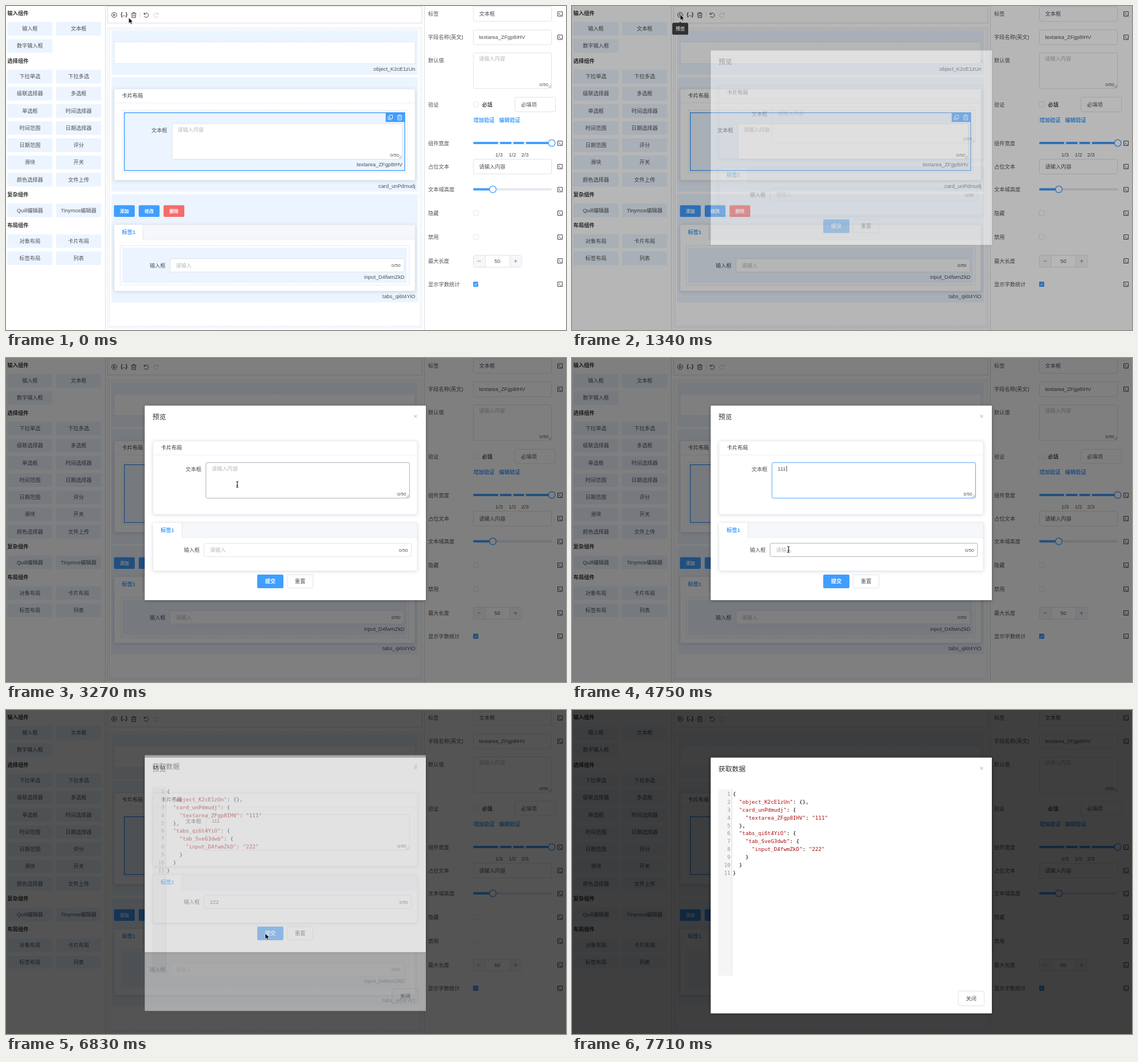
These frames come from a looping animation (983 px wide and 570 px high, 8170 ms). An HTML page:

```html
<!DOCTYPE html>
<html lang="zh-CN">
<head>
<meta charset="utf-8">
<title>表单设计器</title>
<style>
html, body { margin: 0; width: 100%; height: 100%; overflow: hidden; background: #fff; }
svg { display: block; width: 100vw; height: 100vh; }
text { font: 9.24px "Liberation Sans", "Noto Sans CJK SC", "Noto Sans CJK", sans-serif; fill: #505255; }
.dark { fill: #303133; }
.bold { font-weight: 700; }
.blue { fill: #409eff; }
.hint { fill: #b4b7bd; }
.small { font-size: 8.1px; }
.title { font-size: 11.9px; fill: #303133; }
.white { fill: #fff; }
.mid { text-anchor: middle; }
.end { text-anchor: end; }
.code { font-family: "DejaVu Sans Mono", "Liberation Mono", monospace; fill: #000; }
.line { fill: none; stroke: #333; stroke-width: .9; }
.shadow { filter: drop-shadow(0 1.3px 3px rgba(0, 0, 0, .13)); }
</style>
</head>
<body>
<svg id="stage" viewBox="0 0 983 570" preserveAspectRatio="none"></svg>
<style id="motion"></style>
<script>
const LOOP = 8170, BLUE = '#409eff', PALE = '#ecf5ff', BORDER = '#dcdfe6';
const rules = [];

// Holds each [ms, css] state until the next one.
function track(markup, states) {
  const name = 'm' + rules.length;
  rules.push(`@keyframes ${name}{${states.map(([ms, css]) => `${(ms / LOOP * 100).toFixed(4)}%{${css}}`).join('')}}`);
  return `<g style="animation:${name} ${LOOP}ms step-end infinite">${markup}</g>`;
}
function during(markup, ...spans) {
  const states = [[0, 'opacity:0']];
  for (const [from, to] of spans) states.push([from, 'opacity:1'], [to, 'opacity:0']);
  return track(markup, states);
}

const text = (x, y, str, cls = '') => `<text x="${x}" y="${y}" dy=".35em" class="${cls}">${str}</text>`;
const box = (x1, y1, x2, y2, fill, stroke = 'none', more = '') =>
  `<rect x="${x1}" y="${y1}" width="${x2 - x1}" height="${y2 - y1}" fill="${fill}" stroke="${stroke}" ${more}/>`;
const path = (d, more = 'class="line"') => `<path d="${d}" ${more}/>`;
const field = (x1, y1, x2, y2, stroke = BORDER, fill = '#fff') => box(x1, y1, x2, y2, fill, stroke, 'rx="2.6" stroke-width=".9"');
const dashed = (x1, y1, x2, y2, fill = 'none') => box(x1, y1, x2, y2, fill, '#c9d5e4', 'stroke-width=".8" stroke-dasharray="2 1.4"');
const button = (x1, y1, x2, y2, label, fill, cls = 'mid small white bold') =>
  box(x1, y1, x2, y2, fill, 'none', 'rx="2"') + text((x1 + x2) / 2, (y1 + y2) / 2, label, cls);
const grip = (x, y) => path(`M${x - 5} ${y}L${x} ${y - 5}M${x - 2.5} ${y}L${x} ${y - 2.5}`, 'stroke="#777" stroke-width=".7"');
const card = (x1, y1, x2, y2) => `<g class="shadow">${box(x1, y1, x2, y2, '#fff', '#e4e7ed', 'rx="2.6" stroke-width=".8"')}</g>`;

function tabCard(x1, y1, x2, y2, tabEnd) {
  return card(x1, y1, x2, y2) + box(x1, y1, x2, y1 + 26, '#f5f7fa', '#e4e7ed', 'stroke-width=".7"') +
    box(x1, y1, tabEnd, y1 + 27, '#fff') + path(`M${tabEnd} ${y1}v26`, `stroke="${BORDER}" stroke-width=".7"`) +
    text(x1 + 13.5, y1 + 13, '标签1', 'blue bold');
}

function palette() {
  const groups = [
    [12.5, 40, '输入组件', '输入框 文本框 数字输入框'],
    [97, 124, '选择组件', '下拉单选 下拉多选 级联选择器 多选框 单选框 时间选择器 时间范围 日期选择器 日期范围 评分 滑块 开关 颜色选择器 文件上传'],
    [332, 359.5, '复杂组件', 'Quill编辑器 Tinymce编辑器'],
    [386, 413.5, '布局组件', '对象布局 卡片布局 标签布局 列表']
  ];
  return groups.map(([y, first, name, items]) => text(2.5, y, name, 'dark bold') +
    items.split(' ').map((item, i) => {
      const x = i % 2 ? 88 : 2.5, cy = first + (i >> 1) * 30.25;
      return box(x, cy - 12, x + 79, cy + 12, PALE) + text(x + 39.5, cy, item, 'mid');
    }).join('')).join('') + path('M174.5 0V570M734.5 0V570', 'stroke="#dcdcdc"');
}

const trash = (x, y, stroke = '#333') =>
  path(`M${x - 4.5} ${y - 2.8}h9M${x - 1.5} ${y - 3}v-1.5h3v1.5M${x - 3.3} ${y - 2.8}v7.3h6.6v-7.3M${x - 1.1} ${y - .5}v3M${x + 1.1} ${y - .5}v3`,
    `fill="none" stroke="${stroke}" stroke-width=".9"`);

function toolbar() {
  const undo = 'M-3.6 -4v3h3M-3.4 -1.2A3.9 3.9 0 1 1 -3.4 2.2';
  return box(178.5, .5, 730, 30, '#fff', '#dcdcdc') +
    '<circle cx="190" cy="15.7" r="4.5" class="line"/>' + path('M188.7 13.6v4.2l3.4-2.1Z') +
    text(207.3, 15, '{..}', 'mid dark bold') + trash(224.3, 15.8) +
    path('M235.5 10.5v10', 'stroke="#dcdfe6"') +
    path(undo, 'class="line" transform="translate(246 15.7)"') +
    path(undo, 'fill="none" stroke="#c6c8cc" stroke-width=".9" transform="translate(263.3 15.7) scale(-1 1)"');
}

function canvas() {
  return dashed(178.5, 38.5, 730, 566) + dashed(181.5, 41, 727, 563.5) +
    box(185, 43, 723, 121, PALE) + dashed(190, 63, 718, 101.5, '#fff') + text(718.5, 111, 'object_K2cE1zUn', 'end') +
    box(185, 125, 723, 326.5, PALE) + card(190, 146, 718, 306.5) + text(203.5, 157.5, '卡片布局', 'dark') +
    path('M190 170.5H718', 'stroke="#e8ebf1" stroke-width=".8"') + dashed(204, 183.5, 704, 293.5) +
    box(207.7, 187.7, 700, 289.5, PALE, BLUE, 'stroke-width="1.4"') + box(666.5, 187.5, 700, 204, BLUE) +
    path('M671 194v6h5.5M673 192h5.5v6H673Z', 'fill="none" stroke="#fff" stroke-width=".9"') + trash(691, 196, '#fff') +
    text(283, 218.5, '文本框', 'end') + field(291.5, 207, 695.5, 269.5) + text(301, 217.5, '请输入内容', 'hint') +
    text(690, 262, '0/50', 'end small') + grip(694.5, 268.5) +
    text(696, 279, 'textarea_ZFgp8IHV', 'end') + text(718.5, 316.5, 'card_unPdmudj', 'end') +
    box(185, 331, 723, 521.5, PALE) +
    button(189.5, 350.5, 226, 371, '添加', BLUE) + button(233, 350.5, 269.5, 371, '修改', BLUE) + button(276.5, 350.5, 313, 371, '删除', '#f56c6c') +
    tabCard(190, 385, 718, 501.5, 240.5) + dashed(200.5, 421.5, 707.5, 491) + box(204, 425, 704, 487.5, PALE) +
    text(280, 456.5, '输入框', 'end') + field(288, 444.5, 699, 468) + text(298, 456.5, '请输入', 'hint') +
    text(692.5, 456.5, '0/50', 'end small') + text(699.5, 477, 'input_D4fwmZkD', 'end') + text(718.5, 511, 'tabs_qi6t4YiO', 'end');
}

function properties() {
  const labels = { 标签: 14, '字段名称(英文)': 55, 默认值: 96, 验证: 173.5, 组件宽度: 241.5, 占位文本: 282.5, 文本域高度: 323, 隐藏: 364.5, 禁用: 406.5, 最大长度: 448.5, 显示字数统计: 489.5 };
  const script = y => path(`M968.5 ${y - 4}h8v8h-8ZM970.3 ${y - 2}l2 2-2 2M973 ${y + 2.2}h2`);
  const check = y => box(820.5, y - 4.5, 829, y + 4, '#fff', BORDER, 'rx="1.2" stroke-width=".8"');
  const knob = (x, y) => `<circle cx="${x}" cy="${y}" r="5.9" fill="#fff" stroke="${BLUE}" stroke-width="1.3"/>`;
  const bar = (x2, y, fill) => box(820, y - 2, x2, y + 2, fill, 'none', 'rx="2"');
  const input = (y, str) => field(820.5, y - 13, 957.5, y + 13) + text(830.5, y, str);
  return Object.entries(labels).map(([name, y]) =>
      text(741, y, name) + (name === '默认值' || name === '验证' ? '' : script(y))).join('') +
    input(14, '文本框') + input(55, 'textarea_ZFgp8IHV') + input(282.5, '请输入内容') +
    field(820.5, 82.5, 957.5, 145) + text(830, 93, '请输入内容', 'hint') + text(952, 138, '0/50', 'end small') + grip(957, 144) +
    check(173.5) + text(835.5, 173.5, '必填', 'bold') + field(893.5, 160.5, 964.5, 186) + text(904, 173.5, '必填项') +
    text(820.5, 201, '增加验证', 'blue bold') + text(865.5, 201, '编辑验证', 'blue bold') +
    bar(958, 241, BLUE) + [865.5, 889, 911].map((x, i) =>
      `<circle cx="${x}" cy="241" r="2" fill="#fff"/>` + text(x, 262, ['1/3', '1/2', '2/3'][i], 'mid')).join('') + knob(958, 241) +
    bar(958, 322.5, '#e4e7ed') + bar(854, 322.5, BLUE) + knob(854.5, 322.5) +
    check(364.5) + check(406.5) +
    field(820.5, 438.5, 905, 459.5) + box(821, 439, 841, 459, '#f5f7fa') + box(884.5, 439, 904.5, 459, '#f5f7fa') +
    path('M841.5 438.5v21M884.5 438.5v21', `stroke="${BORDER}" stroke-width=".8"`) + text(862.5, 449, '50', 'mid') +
    path('M827.5 448.8h6M891.5 448.8h6M894.5 445.8v6', 'stroke="#777" stroke-width=".8"') +
    box(820, 485, 829, 494, BLUE, 'none', 'rx="1.2"') + path('M822.2 489.5l1.8 1.9 3.2-3.8', 'fill="none" stroke="#fff" stroke-width="1"');
}

// The shade and its dialog fade together; the dialog also drops into place.
function dialog(start, midway, bottom, title, body) {
  const frame = `<g style="filter:drop-shadow(0 1px 3px rgba(0,0,0,.3))">${box(243.5, 83.7, 737, bottom, '#fff', 'none', 'rx="1.3"')}</g>` +
    text(257, 104, title, 'title') + path('M716.4 100l5 5m0-5l-5 5', 'stroke="#909399" stroke-width=".8"');
  const steps = [[start, midway], [start + 150, .98], [start + 300, 1]];
  const sheet = track(frame + body, [[0, 'opacity:0'],
    ...steps.map(([ms, e]) => [ms, `opacity:${e};transform:translateY(${(-13.2 * (1 - e)).toFixed(2)}px)`])]);
  return track(box(0, 0, 983, 570, 'rgba(0,0,0,.5)') + sheet,
    [[0, 'opacity:0'], ...steps.map(([ms, e]) => [ms, `opacity:${e}`])]);
}

// Placeholder, typed digits with caret, and counter of one field.
function typing({ x, y, countX, countY, hint, digit, focus, keys, caretEnd }) {
  const times = [focus, ...keys, LOOP];
  let out = during(text(x, y, hint, 'hint'), [0, keys[0]]) + during(text(countX, countY, '0/50', 'end small'), [0, keys[0]]);
  for (let n = 0; n <= keys.length; n++) {
    const from = times[n], to = times[n + 1], cx = x + .4 + n * 5.14;
    if (n) out += during(text(x, y, digit.repeat(n)) + text(countX, countY, n + '/50', 'end small'), [from, to]);
    if (from < to) out += during(path(`M${cx} ${y - 5}v10`, 'stroke="#222" stroke-width=".8"'), [from, Math.min(to, caretEnd)]);
  }
  return out;
}

function preview() {
  const area = c => field(351, 184, 708.3, 246.5, c), line = c => field(347.8, 326, 711.7, 349.3, c);
  return card(258, 146, 722, 275) + text(272, 158, '卡片布局', 'dark') + path('M258 170.5H722', 'stroke="#e8ebf1" stroke-width=".8"') +
    text(343, 195.5, '文本框', 'end') + area() + during(area('#a9adb5'), [3120, 3410]) + during(area(BLUE), [3410, 5040]) +
    typing({ x: 361, y: 194.5, countX: 702.5, countY: 239, hint: '请输入内容', digit: '1', focus: 3410, keys: [3860, 4010, 4160], caretEnd: 5040 }) +
    grip(707.5, 245.5) +
    tabCard(258, 290, 722, 374.5, 309) + text(340, 337.7, '输入框', 'end') +
    line() + during(line('#a9adb5'), [4600, 5040]) + during(line(BLUE), [5040, 6830]) +
    typing({ x: 358, y: 337.7, countX: 705.5, countY: 338, hint: '请输入', digit: '2', focus: 5040, keys: [5040, 5340, 5490], caretEnd: 5790 }) +
    button(441, 381, 487, 405, '提交', BLUE, 'mid white bold') +
    during(button(441, 381, 487, 405, '提交', '#2188ff', 'mid white bold'), [2530, 2970], [6090, 6830]) +
    field(493.4, 381.4, 539, 404.6) + text(516.2, 393, '重置', 'mid');
}

function result() {
  const data = { object_K2cE1zUn: {}, card_unPdmudj: { textarea_ZFgp8IHV: '111' }, tabs_qi6t4YiO: { tab_SveG3dwb: { input_D4fwmZkD: '222' } } };
  const lines = JSON.stringify(data, null, 2).split('\n').map((row, i) => {
    const y = 148 + i * 13.83, code = row.trimStart();
    return text(278, y, i + 1, 'code end" style="fill:#999') +
      text(282.2 + (row.length - code.length) * 5.56, y, code.replace(/"[^"]*"/g, '<tspan fill="#a11">$&</tspan>'), 'code');
  });
  return box(257, 139, 281, 467.5, '#f5f5f5') + path('M280.7 139V467.5', 'stroke="#d8d8d8" stroke-width=".8"') + lines.join('') +
    field(678, 494.5, 723.5, 520.5) + text(700.7, 507.5, '关闭', 'mid');
}

function pointer() {
  const shapes = {
    arrow: path('M0 0V10.3L2.4 8.1 4 11.7 5.8 10.9 4.2 7.4H7.4Z', 'fill="#000" stroke="#fff" stroke-width=".7"'),
    hand: path('M2.2 6.6V1.2Q3.1 -.2 4 1.2V4.4Q5 3.6 5.8 4.7 6.8 4.1 7.5 5.2 8.8 4.9 9 6.2V8.8L8 11.8H3.6L.4 7.6Q.2 6.1 2.2 6.6Z', 'fill="#fff" stroke="#000" stroke-width=".9" transform="translate(-2.5 -1)"'),
    beam: path('M-2 -5.3Q0 -5.3 0 -4Q0 -5.3 2 -5.3M0 -4V4M-2 5.3Q0 5.3 0 4Q0 5.3 2 5.3M-1.3 1.8H1.3', 'fill="none" stroke="#000" stroke-width="1"')
  };
  const route = [
    [0, 'arrow', 215.5, 20.5], [150, 'arrow', 208, 18], [300, 'arrow', 198, 16], [450, 'arrow', 190, 15],
    [1490, 'arrow', 194, 24], [1640, 'arrow', 225, 80], [1780, 'arrow', 295, 190], [1930, 'arrow', 370, 295],
    [2080, 'arrow', 430, 365], [2230, 'hand', 455, 395], [2380, 'hand', 460, 400], [2680, 'hand', 459, 395],
    [2970, 'beam', 438, 310], [3120, 'beam', 412, 238], [3270, 'beam', 406, 222.5], [3860, 'none', 0, 0],
    [4310, 'beam', 404, 228], [4460, 'arrow', 394, 270], [4600, 'beam', 383, 328], [4750, 'beam', 380, 337],
    [5040, 'none', 0, 0], [5640, 'beam', 382, 338], [5790, 'arrow', 402, 358], [5940, 'arrow', 435, 383],
    [6090, 'hand', 455, 392], [6830, 'arrow', 455, 393], [6980, 'arrow', 500, 400], [7120, 'arrow', 620, 432],
    [7270, 'arrow', 780, 482], [7420, 'arrow', 900, 523], [7570, 'arrow', 951, 540], [7710, 'none', 0, 0]
  ];
  return Object.keys(shapes).map(kind => track(shapes[kind],
    route.map(([ms, k, x, y]) => [ms, `opacity:${+(k === kind)};transform:translate(${x}px,${y}px)`]))).join('');
}

const tooltip = track(path('M187 31l3-3.5 3 3.5Z', 'fill="#303133"') + box(176, 29.5, 204, 50.5, '#303133', 'none', 'rx="2.6"') +
  text(190, 40, '预览', 'mid small white'), [[0, 'opacity:0'], [450, 'opacity:.6'], [600, 'opacity:1'], [1490, 'opacity:.6'], [1640, 'opacity:0']]);

document.getElementById('stage').innerHTML = box(0, 0, 983, 570, '#fff') + palette() + toolbar() + canvas() + properties() +
  dialog(1340, .57, 426, '预览', preview()) + dialog(6830, .67, 533.7, '获取数据', result()) + tooltip + pointer();
document.getElementById('motion').textContent = rules.join('\n');
</script>
</body>
</html>
```
